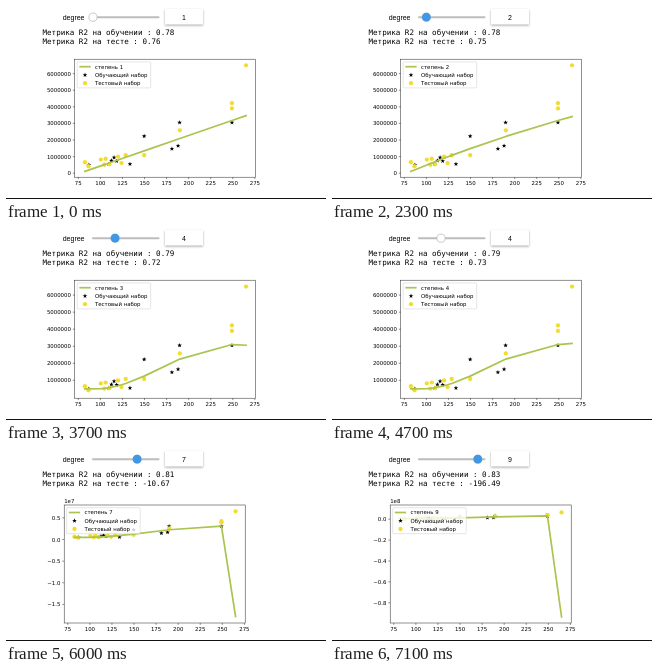
An HTML page for the animation above (7.2 s loop, 320x193 px).

```html
<!DOCTYPE html>
<html lang="ru">
<head>
<meta charset="utf-8">
<title>Polynomial degree</title>
<style>
  html, body { margin: 0; width: 100%; height: 100%; overflow: hidden; background: #fff; }
  svg { display: block; width: 320px; height: 193px; }
  .ui { font: 7px "Liberation Sans", Arial, sans-serif; }
  .log { font: 7.56px "DejaVu Sans Mono", monospace; white-space: pre; }
  .plot { font: 5.4px "DejaVu Sans", sans-serif; }
  .frame, .tick { fill: none; stroke: #222; stroke-width: .5; }
  .fit { fill: none; stroke: #a9c44f; stroke-width: 1.7; stroke-linejoin: round; stroke-linecap: square; }
  .dot { fill: #f3dc30; }
  .legend { fill: #fff; fill-opacity: .8; stroke: #ccc; stroke-width: .5; }
  .end { text-anchor: end; }
  .mid { text-anchor: middle; }
  #input { fill: #fff; filter: drop-shadow(.6px 1px 1px rgba(0, 0, 0, .35)); }
</style>
</head>
<body>
<svg viewBox="0 0 320 193">
  <rect width="320" height="193" fill="#fff"/>
  <g class="ui">
    <text x="78.5" y="13.5" class="end">degree</text>
    <rect x="86" y="10.2" width="67.5" height="2" rx="1" fill="#bdbdbd"/>
    <g id="knob">
      <circle cx="87" cy="11.2" r="4.1" fill="#fff" stroke="#b5b5b5" stroke-width=".7"/>
      <circle id="glow" cx="87" cy="11.2" r="4.4" fill="#3f97e5"/>
    </g>
    <rect id="input" x="159" y="3" width="38" height="15.5"/>
    <text id="value" x="178" y="13.7" class="mid"></text>
  </g>
  <g class="log">
    <text id="train" x="36.5" y="29.4"></text>
    <text id="test" x="36.5" y="38.4"></text>
  </g>
  <g id="plots" class="plot"></g>
  <rect y="192" width="320" height="1" fill="#111"/>
</svg>
<script>
const LOOP = 7200, NOTCH = 100;
const $ = id => document.getElementById(id);
const range = (from, count, step) => Array.from({ length: count }, (_, i) => from + i * step);
const clamp = v => Math.min(1, Math.max(0, v));

// Points are [x, y in millions]: a dense cluster by rule, then the outliers.
const trainSet = [
  ...range(0, 4, 1).map(i => [109.5 + 3 * i, .75 - .2 * Math.cos(1.6 * i)]),
  [87, .5], [133.5, .55], [149.6, 2.23], [181, 1.47], [188, 1.65], [189.7, 3.05], [249, 3.05]
];
const testSet = [
  ...[84.5, 102.5, 108, 122].flatMap(x => {
    const d = x - 84.5;
    return [[x - 2, .66 + d * .009], [x + 2, .42 + d * .005]];
  }),
  [128.7, 1.08], [149.6, 1.08], [190, 2.58], [249, 4.22], [249, 3.9], [265, 6.5]
];
const knots = testSet.map(([x]) => x).sort((a, b) => a - b);

// Fits: a rising line, or an S-shaped rise whose last knot drifts off to `tail`.
const line = x => .1 + (x - 82) * .0184;
const bow = x => line(x) + (x - 82) * (249 - x) * .00002;
const rise = tail => x => {
  const u = Math.max(0, (x - 95) / 154);
  return x > 249 ? tail : .5 + 2.6 * u * u * (3 - 2 * u);
};

const millions = v => v ? v + "000000" : "0";
const scaled = by => v => (v / by).toFixed(1).replace("-", "\u2212");
const wide = { left: 68.7, top: 53.2, zero: 167.2, unit: 16.6, ticks: range(0, 7, 1), label: millions };
const bent = { ...wide, zero: 170.4, unit: 17.05, ticks: range(1, 6, 1) };
const deep = { left: 58.2, top: 57, zero: 91.5, unit: 4.33, ticks: range(-15, 5, 5),
               label: scaled(10), power: "1e7" };
const deeper = { ...deep, zero: 71.2, unit: 1.045, ticks: range(-80, 5, 20),
                 label: scaled(100), power: "1e8" };

// drag, log, show: when the slider moves, the scores change and the chart appears
const models = [
  { degree: 1, drag: 0, log: 0, show: 0, axes: wide, fit: line, train: "0.78", test: "0.76" },
  { degree: 2, drag: 1900, log: 2200, show: 2200, axes: wide, fit: bow, train: "0.78", test: "0.75" },
  { degree: 3, drag: 2700, log: 2900, show: 2900, axes: bent, fit: rise(3.06), train: "0.79", test: "0.72" },
  { degree: 4, drag: 3500, log: 3900, show: 3900, axes: bent, fit: rise(3.16), train: "0.79", test: "0.73" },
  { degree: 7, drag: 5000, log: 5300, show: 5600, axes: deep, fit: rise(-17.8), train: "0.81", test: "-10.67" },
  { degree: 9, drag: 6400, log: 6800, show: 6800, axes: deeper, fit: rise(-93.5), train: "0.83", test: "-196.49" }
];

const text = (x, y, s, cls = "") => `<text x="${x}" y="${y}" class="${cls}">${s}</text>`;
const dot = (x, y) => `<circle class="dot" cx="${x}" cy="${y}" r="2.15"/>`;
const star = (x, y) => {
  const points = range(0, 10, 1).map(i => {
    const r = i % 2 ? 1 : 2.4, a = i * Math.PI / 5;
    return [x + r * Math.sin(a), y - r * Math.cos(a)];
  });
  return `<polygon points="${points.join(" ")}"/>`;
};

function plot({ degree, axes, fit }) {
  const { left, top, zero, unit, ticks, label, power = "" } = axes;
  const bottom = top + 118;
  const px = v => left + 3.6 + (v - 75) * .883;
  const py = v => zero - v * unit;
  const scatter = (mark, data) => data.map(([x, y]) => mark(px(x), py(y))).join("");
  let s = scatter(star, trainSet) + scatter(dot, testSet);
  s += `<polyline class="fit" points="${knots.map(x => [px(x), py(fit(x))]).join(" ")}"/>`;
  s += `<rect class="frame" x="${left}" y="${top}" width="181" height="118"/>`;
  for (const v of range(75, 9, 25)) {
    s += `<path class="tick" d="M${px(v)} ${bottom}v1.9"/>` + text(px(v), bottom + 7.8, v, "mid");
  }
  for (const v of ticks) {
    s += `<path class="tick" d="M${left} ${py(v)}h-1.9"/>` + text(left - 3.8, py(v) + 2, label(v), "end");
  }
  s += text(left, top - 1.7, power);

  const rows = range(top + 7.5, 3, 8.25);
  const names = ["степень " + degree, "Обучающий набор", "Тестовый набор"];
  s += `<rect class="legend" x="${left + 2.5}" y="${top + 2.7}" width="73.5" height="26" rx="1"/>`;
  s += `<path class="fit" d="M${left + 5.5} ${rows[0]}h9.6"/>`;
  s += star(left + 10.3, rows[1]) + dot(left + 10.3, rows[2]);
  s += names.map((name, i) => text(left + 20.3, rows[i] + 1.9, name)).join("");
  return `<g id="plot${degree}">${s}</g>`;
}

$("plots").innerHTML = models.map(plot).join("");

function draw() {
  const t = performance.now() % LOOP;
  const latest = key => models.findLast(m => t >= m[key]);
  const ramp = (start, length) => clamp((t - start) / length);

  // the knob sweeps notch by notch towards the dragged degree
  const target = latest("drag");
  const before = models[models.indexOf(target) - 1] || target;
  const swept = before.degree + 1 + Math.floor((t - target.drag) / NOTCH);
  const degree = Math.min(target.degree, swept);
  $("knob").setAttribute("transform", `translate(${(degree - 1) * 7.35})`);
  $("glow").setAttribute("opacity", ramp(1400, 200) - ramp(4450, 200) + ramp(4950, 50));
  $("value").textContent = degree;

  const scored = latest("log"), charted = latest("show");
  $("train").textContent = "Метрика R2 на обучении : " + scored.train;
  $("test").textContent = "Метрика R2 на тесте : " + scored.test;
  for (const m of models) {
    $("plot" + m.degree).style.display = m === charted && m === scored ? "" : "none";
  }
  requestAnimationFrame(draw);
}
draw();
</script>
</body>
</html>
```
